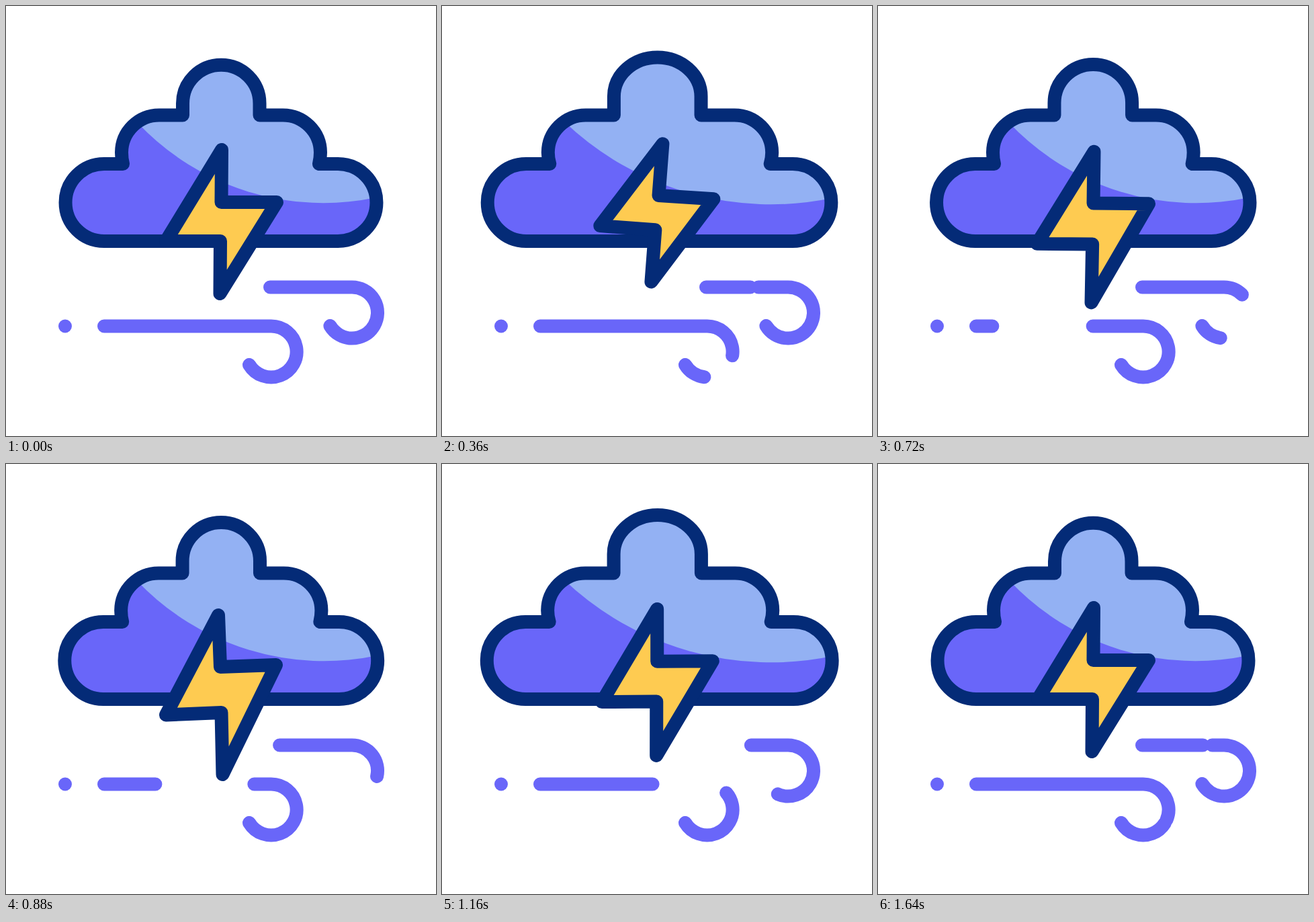
Animation of 640x640 px, one loop 1680 ms. Source, as an HTML page without scripts:

```html
<!DOCTYPE html>
<html lang="en">
<head>
<meta charset="utf-8">
<title>Thunderstorm</title>
<style>
  html, body { margin: 0; width: 100%; height: 100%; overflow: hidden; background: #fff; }
  svg { display: block; width: 100vw; height: 100vh; }

  :root {
    --navy: #042b77;
    --violet: #6966f9;
    --sky: #93b1f3;
    --amber: #fecb51;
    --loop: 1680ms infinite;
    --swing: cubic-bezier(.55, 0, .45, 1);
  }

  .outline { stroke: var(--navy); stroke-width: 20; stroke-linejoin: round; }
  .cloud { animation: cloud var(--loop) var(--swing); }
  .light { fill: var(--sky); animation: light var(--loop) var(--swing); }
  .bolt { fill: var(--amber); animation: bolt var(--loop) var(--swing); }

  /* The cloud swells twice per loop */
  @keyframes cloud {
    0%, 2.4%, 47.6%, 92.9%, 100% {
      d: path("M146 350A57.5 57.5 0 0 1 146 235H174Q172 227 172 218A56 56 0 0 1 228 162.5H263V145A57 57 0 0 1 377.5 145V162.5H412A56 56 0 0 1 468 218Q468 227 466 235H494A57.5 57.5 0 0 1 494 350Z");
    }
    26.2%, 71.4% {
      d: path("M124 350A57.5 57.5 0 0 1 124 235H159.5Q157 227 157 218A56 56 0 0 1 213 162.5H255.5V134A65 58 0 0 1 386 134V162.5H436.5A56 56 0 0 1 492.5 218Q492.5 227 490 235H523.5A57.5 57.5 0 0 1 523.5 350Z");
    }
  }
  @keyframes light {
    0%, 2.4%, 47.6%, 92.9%, 100% {
      d: path("M196 174A380 380 0 0 0 553 284.5V60H196Z");
    }
    26.2%, 71.4% {
      d: path("M181 172A450 450 0 0 0 582 286V60H181Z");
    }
  }

  /* The bolt recoils upwards, strikes down, then settles */
  @keyframes bolt {
    0%, 8.3%, 77.4%, 100% {
      d: path("M321 214L320.5 292L403 292L318.5 428L319 350L238 350Z");
    }
    31% {
      d: path("M332 201L323.5 277L405 285L308 402L316.5 325L234 316Z");
    }
    51.8% {
      d: path("M316 225L319 302L402 299L322.5 462L320.5 370L238 373.5Z");
    }
  }

  /* A gap travels along each gust while it opens and closes */
  .wind { fill: none; stroke: var(--violet); stroke-width: 20; stroke-linecap: round; }
  .low { animation: drift-low var(--loop) linear, gap-low var(--loop) linear; }
  .high { animation: drift-high var(--loop) linear, gap-high var(--loop) linear; }

  @keyframes drift-low {
    from { stroke-dashoffset: 48.3px; }
    to { stroke-dashoffset: 182.7px; }
  }
  @keyframes drift-high {
    from { stroke-dashoffset: -7.1px; }
    to { stroke-dashoffset: 135.7px; }
  }
  @keyframes gap-low {
    0% { stroke-dasharray: 100px, 0px; }
    16.1% { stroke-dasharray: 100px, 0px; animation-timing-function: cubic-bezier(.333, .9, .667, 1); }
    48.8% { stroke-dasharray: 62.8px, 37.2px; animation-timing-function: cubic-bezier(.333, .12, .667, .453); }
    98.8%, 100% { stroke-dasharray: 100px, 0px; }
  }
  @keyframes gap-high {
    0% { stroke-dasharray: 100px, 0px; }
    18.5% { stroke-dasharray: 100px, 0px; animation-timing-function: cubic-bezier(.333, .38, .667, 1); }
    50.6% { stroke-dasharray: 62.7px, 37.3px; animation-timing-function: cubic-bezier(.333, 0, .667, .333); }
    100% { stroke-dasharray: 98.5px, 1.5px; }
  }
</style>
</head>
<body>
<svg viewBox="0 0 640 640">
  <clipPath id="inside"><path class="cloud"/></clipPath>
  <path class="cloud" fill="var(--violet)"/>
  <g clip-path="url(#inside)"><path class="light"/></g>
  <path class="cloud outline" fill="none"/>
  <path class="bolt outline"/>

  <path class="wind high" pathLength="100" d="M482.4 476A38 38 0 1 0 515 418.5H393"/>
  <path class="wind low" pathLength="100" d="M362 534A38 38 0 1 0 394 476.5H146"/>
  <circle cx="88" cy="476.5" r="10" fill="var(--violet)"/>
</svg>
</body>
</html>
```
